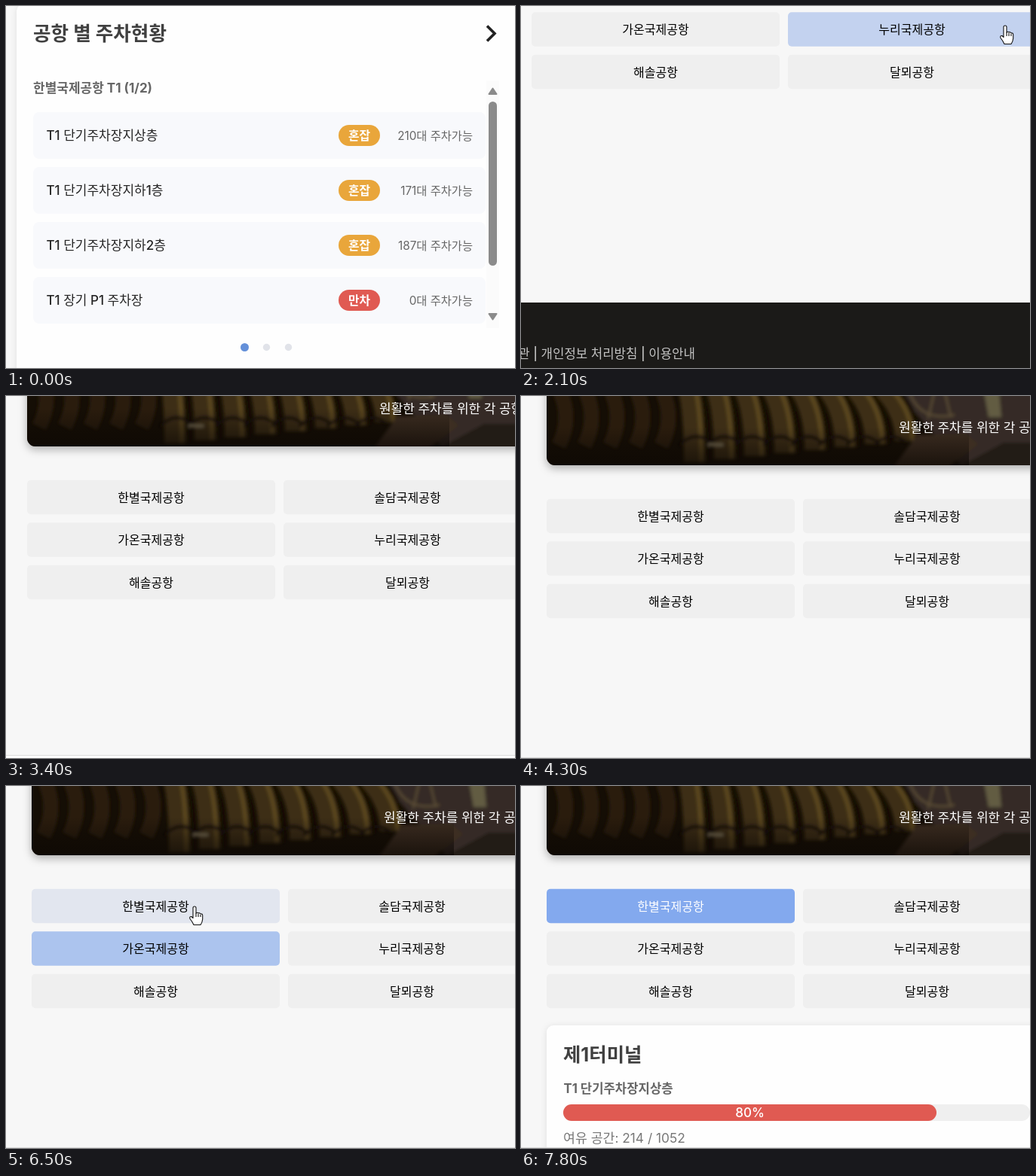
An HTML page that plays this animation: 675 px wide and 481 px high, repeating every 8 s.

```html
<!DOCTYPE html>
<html lang="ko">
<head>
<meta charset="utf-8">
<title>주차현황</title>
<style>
  html, body { margin: 0; width: 100%; height: 100%; overflow: hidden; background: #f7f7f7; }
  svg { display: block; width: 675px; height: 481px; }
  text { font-family: Inter, "Noto Sans CJK KR", "Noto Sans CJK", sans-serif; white-space: pre; }
  .card { fill: #fefefe; filter: drop-shadow(0 1px 4px rgba(0, 0, 0, .1)); }
  .banner { filter: drop-shadow(0 4px 6px rgba(0, 0, 0, .3)); }
</style>
</head>
<body>
<svg id="stage" viewBox="0 0 675 481"></svg>
<script>
const LOOP = 8000, STEP = 100;
const PAGE_CUT = 2000, PANEL_CUT = 7200;
const HOVER_RISE = 0.22, HOVER_FALL = 0.3;
const GREY = [239, 239, 239], BLUE = [131, 169, 238];

const rect = (x, y, w, h, r, fill, extra = '') =>
  `<rect x="${x}" y="${y}" width="${w}" height="${h}" rx="${r}" fill="${fill}" ${extra}/>`;

// Text is centred vertically on cy.
const label = (str, x, cy, size, weight, fill, anchor = 'start') =>
  `<text x="${x}" y="${cy + size * 0.37}" font-size="${size}" font-weight="${weight}" fill="${fill}" text-anchor="${anchor}">${str}</text>`;

const lots = [
  ['T1 단기주차장지상층', '혼잡', 210],
  ['T1 단기주차장지하1층', '혼잡', 171],
  ['T1 단기주차장지하2층', '혼잡', 187],
  ['T1 장기 P1 주차장', '만차', 0]
];

const airports = ['한별국제공항', '솔담국제공항', '가온국제공항', '누리국제공항', '해솔공항', '달뫼공항']
  .map((name, i) => ({ name, x: 34 + (i % 2) * 340, y: 136.8 + Math.floor(i / 2) * 56.5, w: 329, h: 45.5 }));

function statusPage() {
  const rows = lots.map(([name, state, free], i) => {
    const y = 141 + i * 73, mid = y + 31;
    return rect(36, y, 600, 62, 8, '#f8f9fc') +
      label(name, 53.5, mid, 17, 500, '#252525') +
      rect(441, mid - 14, 55, 28, 14, free ? '#e9a63b' : '#e05a52') +
      label(state, 468.5, mid, 15.8, 700, '#fff', 'middle') +
      label(free + '대 주차가능', 619, mid, 15.3, 400, '#666', 'end');
  }).join('');
  const dots = [316.5, 345.5, 374.5].map((x, i) =>
    `<circle cx="${x}" cy="453.5" r="${i ? 4.7 : 5.5}" fill="${i ? '#e1e3e9' : '#6490d9'}"/>`).join('');
  const arrow = d => `<path d="${d}" fill="#8b8b8b" stroke="#8b8b8b" stroke-width="2" stroke-linejoin="round"/>`;
  return rect(14, -4, 663, 520, 12, '#fefefe', 'class="card"') +
    label('공항 별 주차현황', 36, 36.5, 25.6, 700, '#404040') +
    '<path d="M638 26.5L648 36.5L638 46.5" fill="none" stroke="#222" stroke-width="3.6"/>' +
    label(airports[0].name + ' T1 (1/2)', 36, 109, 17, 700, '#666') +
    rows + rect(637, 99, 17, 329, 0, '#fbfbfb') +
    rect(640, 127, 11, 218, 5.5, '#8b8b8b') +
    arrow('M640.5 117L650.5 117L645.5 109.5Z') + arrow('M640.5 409L650.5 409L645.5 416.5Z') + dots;
}

// A row of curved seat backs in a dim hall.
function photo() {
  let slats = '';
  for (let i = 0; i < 8; i++) {
    const x = 222 + i * 37, lean = 8 + i * 3, foot = 88 - i * 4;
    const curve = dx => `M${x + dx} -10Q${x + dx + lean} 20 ${x + dx + lean} ${foot}`;
    slats += `<path d="${curve(0)}" stroke="#3d2f14" stroke-width="28"/>` +
      `<path d="${curve(9)}" stroke="#5d4a22" stroke-width="5"/>` +
      `<path d="${curve(17)}" stroke="#120b04" stroke-width="5"/>` +
      `<path d="M${x - 12} 66Q${x + 8} 44 ${x + 30} 62" stroke="#160e07" stroke-width="4"/>`;
  }
  let shade = '';
  for (let i = 0; i < 5; i++)
    shade += `<path d="M${52 + i * 34} -5Q${68 + i * 34} 30 ${50 + i * 34} 66" stroke="#291e0c" stroke-width="20"/>`;
  return `<g class="banner"><g clip-path="url(#frame)">
    ${rect(34, -250, 700, 342, 0, '#150e05')}
    <g fill="none" filter="url(#soft)">
      <path d="M495 -10H740V100H590Z" fill="#342a25"/>
      ${shade}${slats}
      <path d="M490 100L525 52L590 50L606 64L560 100Z" fill="#3c2f22"/>
      <path d="M515 -5Q530 35 575 25M562 -5L570 28M548 -5L540 30" stroke="#5c4d36" stroke-width="2.5"/>
      <path d="M614 -5H634L637 28H620Z" fill="#625c42"/>
      <path d="M248 65H268" stroke="#7a6e54" stroke-width="4"/>
      <path d="M570 100L640 62H740V100Z" fill="#241b17"/>
    </g>
    ${rect(34, 0, 560, 92, 0, 'url(#dusk)')}
  </g></g>`;
}

function airportPage() {
  const buttons = airports.map((a, i) => `<g id="b${i}">` + rect(a.x, a.y, a.w, a.h, 5, '#efefef') +
    label(a.name, a.x + a.w / 2, a.y + 23, 16, 400, '#000', 'middle') + '</g>').join('');
  const panel = rect(34, 318, 663, 300, 9, '#fefefe', 'class="card"') +
    label('제1터미널', 56, 357, 25.4, 700, '#404040') +
    label('T1 단기주차장지상층', 56.5, 402, 16.7, 700, '#666') +
    rect(56, 423, 619, 22, 11, '#efefef') + rect(56, 423, 495, 22, 11, '#e05a52') +
    label('80%', 303.5, 434, 17, 500, '#fff', 'middle') +
    label('여유 공간: 214 / 1052', 56, 468, 17.3, 400, '#777');
  return photo() + label('원활한 주차를 위한 각 공항의 정보', 501, 41.5, 17, 500, '#fff') +
    buttons + `<g id="panel">${panel}</g>` +
    rect(-20, 579, 760, 200, 0, '#1b1a18') +
    label('이용약관 | 개인정보 처리방침 | 이용안내', 251, 647, 16.8, 500, '#c2c2c2', 'end');
}

const stage = document.getElementById('stage');
stage.innerHTML = `<defs>
    <clipPath id="frame">${rect(34, -250, 700, 342, 11, '#000')}</clipPath>
    <filter id="soft"><feGaussianBlur stdDeviation="2"/></filter>
    <linearGradient id="dusk" x1="0" y1="0" x2="0" y2="1">
      <stop offset=".45" stop-color="#0d0804" stop-opacity="0"/>
      <stop offset="1" stop-color="#0d0804" stop-opacity=".7"/>
    </linearGradient>
  </defs>
  ${rect(0, 0, 675, 481, 0, '#f7f7f7')}
  <g id="status">${statusPage()}</g>
  <g id="airports">${airportPage()}</g>
  <g id="edge">${rect(0, 0, 675, 20, 0, '#fff')}${rect(0, 0, 675, 1, 0, '#dcdcdc')}</g>
  <g id="cursor" fill="#fff" stroke="#111" stroke-width="1.1" stroke-linejoin="round">
    <path id="arrow" d="M0 0V17L4 13.5L6.7 19.5L9.4 18.3L6.7 12.5H12Z"/>
    <g id="hand">
      <path d="M-2 2Q-2 0 0 0Q2 0 2 2V9Q3.5 7.5 5 9Q6.5 8 8 10Q10.7 9.5 10.7 12V17Q10.4 21 8 24.5H-1Q-3 20 -6 16.5Q-7 13 -4 13.5L-2 15.5Z"/>
      <path d="M2 9V14M5 10V14M8 11V14" fill="none"/>
    </g>
  </g>
  <circle id="press" r="15" fill="#ff0" fill-opacity=".55"/>`;
const $ = id => document.getElementById(id);

// Keys are [time, x, y]; the pointer is hidden outside each path.
const paths = [
  [[100, 210, 470], [300, 300, 390], [600, 520, 170], [900, 638, 34], [1400, 640, 30], [1700, 642, 26], [2500, 642, 26], [2600, 655, 60], [2700, 690, 72]],
  [[3700, 655, 66], [3800, 600, 140], [3900, 590, 160], [4000, 640, 176], [4100, 690, 186]],
  [[6100, 350, 200], [6200, 310, 216], [6400, 262, 200], [6500, 250, 160], [7400, 250, 160], [7500, 310, 128], [7600, 500, 95], [7700, 645, 70], [7800, 700, 60]]
];
const camera = [[0, -20, -185], [3100, -20, -185], [3200, -17, -145], [3300, -11, -75], [3400, -6, -25], [3500, 0, 0]];
const presses = [[1600, 1900], [7000, 7200]];

function along(keys, t) {
  const i = keys.findIndex(k => k[0] > t);
  if (i < 0) return keys[keys.length - 1].slice(1);
  if (i === 0) return keys[0].slice(1);
  const [t0, x0, y0] = keys[i - 1], [t1, x1, y1] = keys[i];
  const u = (t - t0) / (t1 - t0);
  return [x0 + (x1 - x0) * u, y0 + (y1 - y0) * u];
}

function pointerAt(t) {
  const path = paths.find(p => t >= p[0][0] && t < p[p.length - 1][0]);
  return path ? along(path, t) : null;
}

function hoveredAt(t) {
  const p = pointerAt(t);
  if (!p || t < PAGE_CUT) return -1;
  const [cx, cy] = along(camera, t), x = p[0] - cx, y = p[1] - cy;
  return airports.findIndex(a => x >= a.x && x <= a.x + a.w && y >= a.y && y <= a.y + a.h);
}

function hoverLevels(t) {
  const levels = airports.map(() => 0);
  for (let s = PAGE_CUT; s <= t; s += STEP) {
    const over = hoveredAt(s);
    levels.forEach((v, i) => {
      levels[i] = Math.max(0, Math.min(1, v + (i === over ? HOVER_RISE : -HOVER_FALL)));
    });
  }
  return levels.map(v => v * v * (3 - 2 * v));
}

const show = (id, on) => $(id).setAttribute('display', on ? 'inline' : 'none');
const move = (id, [x, y]) => $(id).setAttribute('transform', `translate(${x} ${y})`);

function render(t) {
  const second = t >= PAGE_CUT, pointer = pointerAt(t);
  show('status', !second);
  show('airports', second);
  move('airports', along(camera, t));
  show('panel', t >= PANEL_CUT);
  show('edge', t >= 3400);
  move('edge', [0, t < 3500 ? 477 : 480]);

  hoverLevels(t).forEach((level, i) => {
    const active = i === 0 && t >= PANEL_CUT;
    const [box, text] = $('b' + i).children;
    const mix = GREY.map((c, k) => Math.round(c + (BLUE[k] - c) * (active ? 1 : level)));
    box.setAttribute('fill', `rgb(${mix})`);
    text.setAttribute('fill', active ? '#fff' : '#000');
  });

  show('cursor', pointer);
  show('press', pointer && presses.some(([a, b]) => t >= a && t <= b));
  if (pointer) {
    const hand = second ? hoveredAt(t) >= 0 : t >= 900;
    show('hand', hand);
    show('arrow', !hand);
    move('cursor', pointer);
    move('press', [pointer[0] - 1, pointer[1] + 2]);
  }
}

const start = performance.now();
function tick() {
  const t = (performance.now() - start) % LOOP;
  render(Math.floor(t / STEP) * STEP);
  requestAnimationFrame(tick);
}
tick();
</script>
</body>
</html>
```
